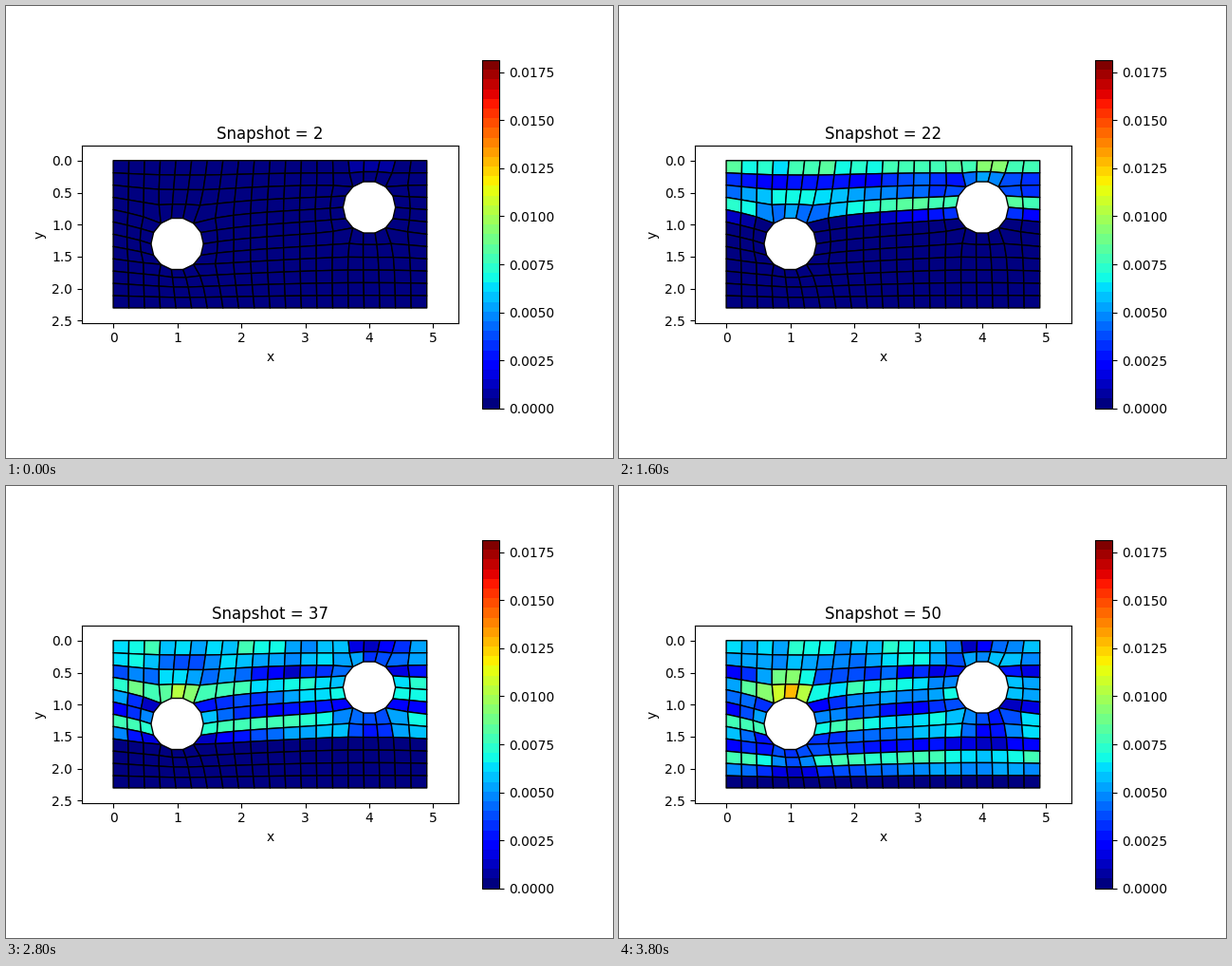
Recreate the animation shown at these times as a matplotlib script. Size 640 by 476 pixels, loop 4 s.

```python
import numpy as np
import matplotlib.pyplot as plt
from matplotlib.animation import FuncAnimation
from matplotlib.collections import PolyCollection

FRAMES, INTERVAL = 20, 200
W, H = 4.9, 2.3
COLS, ROWS = 20, 12
VMAX = 0.01813
RADIUS, CORNERS = 0.41, 14
SNAPSHOTS = np.linspace(2, 50, FRAMES).astype(int)

# Each hole takes the place of 3 x 4 cells, counted from (col, row).
HOLES = [
    dict(x=1.0, y=1.3, col=3, row=4, start=24, peak=35, period=15, strength=.32),
    dict(x=4.0, y=.73, col=15, row=2, start=14, peak=31.5, period=11.5, strength=.26),
]


def rim():
    """Cell offsets round a 3 x 4 opening, counter-clockwise from the right."""
    return ([(3, 2), (3, 1)] + [(3 - i, 0) for i in range(3)]
            + [(0, j) for j in range(4)] + [(i, 4) for i in range(3)]
            + [(3, 4), (3, 3)])


def build_mesh():
    """Regular grid fitted to the holes and relaxed in between."""
    x, y = np.meshgrid(np.linspace(0, W, COLS + 1), np.linspace(0, H, ROWS + 1))
    p = np.dstack([x, y])
    free = np.zeros(x.shape, bool)
    free[1:-1, 1:-1] = True
    solid = np.ones((ROWS, COLS), bool)
    for h in HOLES:
        c, r = h["col"], h["row"]
        solid[r:r + 4, c:c + 3] = False
        free[r:r + 5, c:c + 4] = False
        for k, (i, j) in enumerate(rim()):
            a = 2 * np.pi * k / CORNERS
            p[r + j, c + i] = (h["x"] + RADIUS * np.cos(a),
                               h["y"] - RADIUS * np.sin(a))
    for _ in range(400):
        mean = (p[:-2, 1:-1] + p[2:, 1:-1] + p[1:-1, :-2] + p[1:-1, 2:]) / 4
        p[1:-1, 1:-1][free[1:-1, 1:-1]] = mean[free[1:-1, 1:-1]]
    quads = np.stack([p[:-1, :-1], p[:-1, 1:], p[1:, 1:], p[1:, :-1]], axis=2)
    return quads[solid]


quads = build_mesh()
cx, cy = quads.mean(axis=1).T
grain = np.random.default_rng(4).uniform(-1, 1, len(quads))


def blob(x, y, w, h):
    return np.exp(-((cx - x) / w) ** 2 - ((cy - y) / h) ** 2)


def field(s):
    """Wave running down from the top edge and bouncing off the holes."""
    z = .0435 * s - cy
    ramp = np.clip((z + .12) / .3, 0, 1)
    ramp = ramp * ramp * (3 - 2 * ramp)
    age = np.clip(z / 1.2, 0, 1)
    v = .27 + .19 * (1 - .4 * age) * np.cos(2 * np.pi * (z - .3) / .56)
    v += age * (.05 * np.sin(4 * cx + 3 * cy - .2 * s) + .05 * grain)
    for h in HOLES:
        growth = np.clip((s - h["start"]) / 10, 0, 1.25)
        bounce = np.cos(2 * np.pi * (s - h["peak"]) / h["period"])
        v += h["strength"] * growth * bounce * blob(h["x"], h["y"] - .62, .42, .18)
        ramp = ramp * (1 - .6 * blob(h["x"] + .05, h["y"] + .7, .4, .35))
    return np.clip(v, .03, 1) * ramp * VMAX


fig, ax = plt.subplots(figsize=(6.4, 4.76), dpi=100)
cells = PolyCollection(quads, cmap=plt.get_cmap("jet", 36),
                       edgecolors="black", linewidths=1)
cells.set_clim(0, VMAX)
cells.set_array(field(SNAPSHOTS[0]))
ax.add_collection(cells)
ax.set_aspect("equal")
ax.set_xlim(-.1 * W, 1.1 * W)
ax.set_ylim(1.1 * H, -.1 * H)
ax.set_xlabel("x")
ax.set_ylabel("y")
title = ax.set_title("", pad=5.4)
fig.colorbar(cells, ax=ax)


def update(i):
    s = SNAPSHOTS[i]
    cells.set_array(field(s))
    title.set_text(f"Snapshot = {s}")
    return cells, title


anim = FuncAnimation(fig, update, frames=FRAMES, interval=INTERVAL,
                     repeat=True, repeat_delay=0)
plt.show()
```
